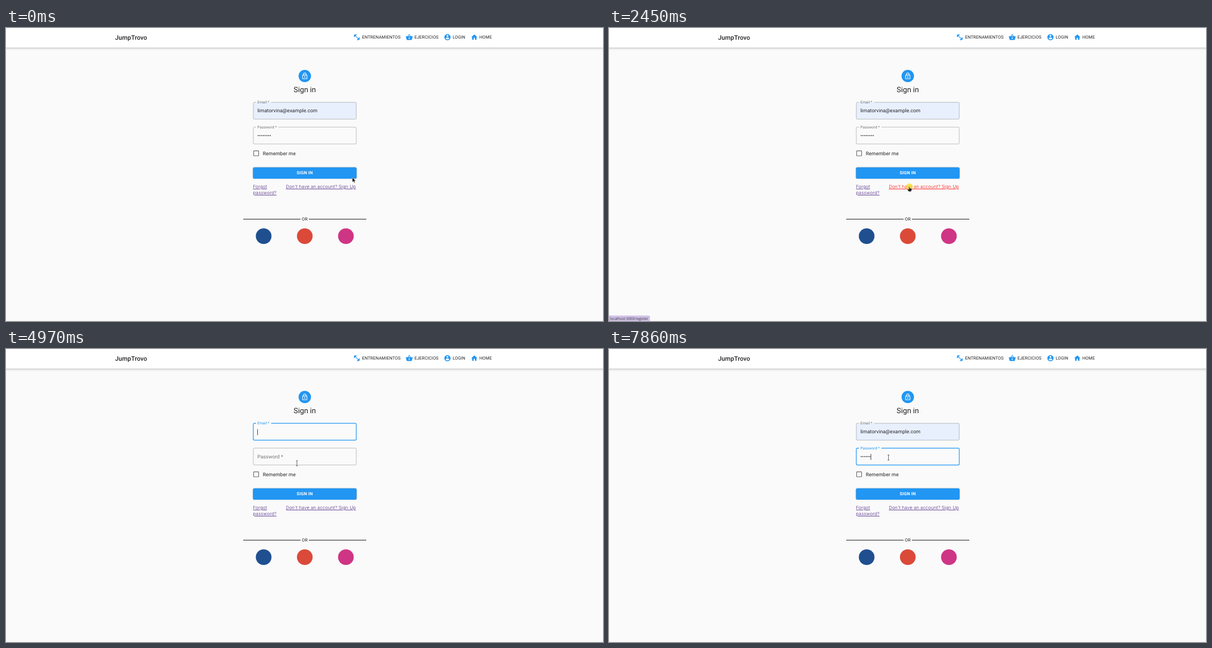
An HTML page that plays this animation: 1067 px wide and 525 px high, repeating every 7.99 s.

```html
<!DOCTYPE html>
<html lang="es">
<head>
<meta charset="utf-8">
<title>Sign in</title>
<style>
  html, body { margin: 0; width: 100%; height: 100%; overflow: hidden; background: #fafafa; }
  svg { display: block; }
  text { font: 8.89px Roboto, sans-serif; letter-spacing: .00938em; fill: #212121; text-rendering: geometricPrecision; white-space: pre; }
  .small { font-size: 7.78px; letter-spacing: .0107em; }
  .brand { font-size: 11.11px; font-weight: 500; }
  .title { font-size: 13.34px; letter-spacing: 0; text-anchor: middle; }
  .mid { text-anchor: middle; }
  .cta { font-size: 7.78px; font-weight: 700; letter-spacing: .0286em; text-anchor: middle; fill: #fff; }
  .link { font: 8.1px Inter, sans-serif; font-weight: 350; letter-spacing: .15px; fill: #4c2383; text-decoration: underline .6px; text-underline-offset: 1.2px; }
  .link.hot { fill: #f00; }
  .menu text { font: 6.75px "Open Sans", sans-serif; letter-spacing: 0; fill: #f1f1f1; }
  .menu .bold { font-weight: 600; }
  .menu rect { fill: #28292c; filter: drop-shadow(0 1px 1px #0005); }
  .menu path { stroke: #3e3f43; stroke-width: .7; }
  .bar { filter: drop-shadow(0 .9px .6px #0007) drop-shadow(0 1px 2px #0004); }
  .button { fill: #2196f3; filter: drop-shadow(0 .9px .5px #0006) drop-shadow(0 .5px 1px #0003); }
  #status text { font: 6.4px "Open Sans", sans-serif; letter-spacing: 0; fill: #33303a; }
</style>
</head>
<body>
<svg id="stage" width="1067" height="525" viewBox="0 0 1067 525"></svg>
<script>
const LOOP = 7990;
const MAIL = 'limatorvina@example.com', MAIL2 = 'torvinalima57@example.com';
const OPEN_REGISTER = 2580, OPEN_LOGIN = 4640, FILL = 5700, FOCUS_PASS = 6180;
const KEYS = [6910, 6980, 7180, 7450, 7660, 7860];
const CLICKS = [2380, 3250, 4520, 5180, 5640, 6180];
const stage = document.getElementById('stage');
const $ = id => document.getElementById(id);

const text = (x, y, s, cls = '', id = '') => `<text x="${x}" y="${y}" class="${cls}" id="${id}">${s}</text>`;
const icon = (x, y, d, fill = '#2196f3') =>
  `<path transform="translate(${x - 6.67} ${y - 6.67}) scale(.5557)" d="${d}" fill="${fill}" fill-rule="evenodd"/>`;

const icons = {
  weights: 'M20.57 14.86L22 13.43 20.57 12 17 15.57 8.43 7 12 3.43 10.57 2 9.14 3.43 7.71 2 5.57 4.14 4.14 2.71 2.71 4.14l1.43 1.43L2 7.71l1.43 1.43L2 10.57 3.43 12 7 8.43 15.57 17 12 20.57 13.43 22l1.43-1.43L16.29 22l2.14-2.14 1.43 1.43 1.43-1.43-1.43-1.43L22 16.29z',
  basket: 'M17.2 9l-4.4-6.6q-.8-.8-1.6 0L6.8 9H2q-1.2.2-1 1.3l2.6 9.2Q4 21 5.5 21h13q1.5 0 1.9-1.5l2.6-9.2Q23.2 9.2 22 9zM9 9l3-4.4L15 9zm3 8a2 2 0 1 1 .01 0z',
  person: 'M12 2a10 10 0 1 0 .01 0zm0 3a3 3 0 1 1-.01 0zm0 14.2a7.2 7.2 0 0 1-6-3.2c0-2 4-3.1 6-3.1s6 1.1 6 3.1a7.2 7.2 0 0 1-6 3.2z',
  home: 'M10 20v-6h4v6h5v-8h3L12 3 2 12h3v8z',
  lock: 'M12 17a2 2 0 1 0-.01 0zM18 8h-1V6A5 5 0 0 0 7 6v2H6a2 2 0 0 0-2 2v10a2 2 0 0 0 2 2h12a2 2 0 0 0 2-2V10a2 2 0 0 0-2-2zM8.9 6a3.1 3.1 0 0 1 6.2 0v2H8.9zM18 20H6V10h12z'
};
const nav = [
  [627, 636.4, 'ENTRENAMIENTOS', 'weights'], [720.7, 730, 'EJERCICIOS', 'basket'],
  [789, 798.3, 'LOGIN', 'person'], [837, 846, 'HOME', 'home']
];

const field = (id, y) => `<g id="${id}" data-y="${y}">
  <rect x="442" y="${y + .4}" width="184" height="30.2" rx="2" fill="#e8f0fe"/>
  <path fill="none"/>
  <text class="label"></text>
  <text class="value" x="449.3" y="${y + 18.6}"></text>
  <line y1="${y + 10.8}" y2="${y + 21.6}" stroke="#111" stroke-width=".8"/></g>`;

const menu = (id, bottom, rows) => `<g id="${id}" class="menu">
  <rect x="441.5" y="164.5" width="185" height="${bottom - 164.5}" rx="2"/>
  <path d="M441.5 ${bottom - 22}h185"/>${rows}${text(448, bottom - 8.3, 'Gestionar...')}</g>`;

const account = (mail, i) =>
  text(448, 178 + i * 36, mail, 'bold') + text(448, 189 + i * 36, '••••••••');

stage.innerHTML = `
  <rect class="bar" x="-10" y="-10" width="1087" height="45" fill="#fff"/>
  ${text(195, 20.7, 'JumpTrovo', 'brand')}
  ${nav.map(([ix, x, s, k]) => icon(ix, 16.5, icons[k]) + text(x, 19.1, s, 'small')).join('')}
  <circle id="avatar" cx="534" cy="86" r="11.1"/>
  ${icon(534, 86, icons.lock, '#fff')}
  ${text(534, 115, '', 'title', 'title')}
  ${field('email', 132.7)}
  ${field('second', 177.2)}
  <g id="login">
    <rect x="442.6" y="220.1" width="8.9" height="8.9" rx=".6" fill="none" stroke="#6a666a" stroke-width="1.1"/>
    ${text(459, 227.6, 'Remember me')}
    ${text(441.5, 287, 'Forgot', 'link')}${text(441.5, 298.1, 'password?', 'link')}
    ${text(500.2, 287, "Don't have an account? Sign Up", 'link', 'signUp')}
  </g>
  <g id="register">
    ${field('third', 221.7)}
    ${text(441.5, 308.2, 'Have account? Login!', 'link', 'haveOne')}
  </g>
  <g id="submit">
    <rect class="button" x="441.5" y="249.8" width="185" height="20.2" rx="2.2"/>
    ${text(534, 262.1, '', 'cta', 'cta')}
  </g>
  <g id="social">
    <path d="M424 342.5H526.5M541.3 342.5H644" stroke="#1c1c1c"/>
    ${text(534, 345.3, 'OR', 'small mid')}
    <circle cx="460.5" cy="373" r="14" fill="#1f4f8f"/>
    <circle cx="534" cy="373" r="14" fill="#db4a39"/>
    <circle cx="607.5" cy="373" r="14" fill="#cf3585"/>
  </g>
  ${menu('mailMenu', 216, text(448, 181.6, MAIL2, 'bold'))}
  ${menu('accountMenu', 296, [MAIL, MAIL2, 'limatorvina57@example.com'].map(account).join(''))}
  <g id="status"><rect y="515.3" height="12" x="-3" rx="2" fill="#d0c0e6"/>${text(2, 523, '')}</g>
  <circle id="click" r="6" fill="#f4df2f" opacity=".8"/>
  <g id="pointer">
    <path id="arrow" d="M0 0V8.3L2 6.5 3.3 9.3 4.8 8.6 3.5 5.9H6.2Z" fill="#111" stroke="#fff" stroke-width=".5"/>
    <path id="beam" d="M-1.7-4.6H1.7M0-4.6V4.6M-1.7 4.6H1.7" fill="none" stroke="#444" stroke-width=".8"/>
    <path id="hand" d="M-1.2-3V1.2L-3.2.3-3.8 1.4-1.5 5H3L4.2 1.5V-.2L.4-1.1V-3Q-.4-4-1.2-3Z" fill="#222" stroke="#fff" stroke-width=".4"/>
  </g>`;

// time, x, y, shape shown from here on
const path = [
  [0, 619, 268, 'arrow'], [70, 619, 268, 'arrow'], [350, 588, 212, 'arrow'], [430, 572, 192, 'beam'],
  [820, 490, 151, 'beam'], [1100, 476, 155, 'beam'], [1350, 500, 190, 'beam'], [1500, 520, 225, 'arrow'],
  [1640, 528, 266, 'hand'], [1850, 534, 283, 'hand'], [2300, 537, 288, 'hand'], [2640, 537, 288, 'arrow'],
  [2950, 540, 165, 'beam'], [3200, 530, 150, 'beam'], [3330, 532, 152, 'arrow'], [3870, 698, 239, 'arrow'],
  [4080, 660, 262, 'arrow'], [4320, 505, 304, 'hand'], [4520, 488, 305, 'hand'], [4660, 488, 305, 'arrow'],
  [4860, 512, 225, 'beam'], [4970, 520, 205, 'beam'], [5170, 506, 150, 'beam'], [5230, 505, 152, 'arrow'],
  [5370, 500, 180, 'arrow'], [FILL, 500, 180, 'beam'], [5930, 500, 180, 'beam'], [6150, 499.5, 194.5, 'beam'],
  [LOOP, 499.5, 194.5, 'beam']
];

function pointerAt(t) {
  const i = path.findIndex(p => p[0] > t) - 1;
  const [t0, x0, y0, shape] = path[i], [t1, x1, y1] = path[i + 1];
  const k = (t - t0) / (t1 - t0);
  return { x: x0 + (x1 - x0) * k, y: y0 + (y1 - y0) * k, shape };
}

const show = (id, on) => $(id).style.display = on ? '' : 'none';

// lift: 0 rests the label inside the box, 1 sets it on the border
function setField(id, name, gap, { value = '', focus = false, hover = false, filled = false, lift = 0, caret = false }) {
  const g = $(id), y = +g.dataset.y;
  const [fill, border, label, val, bar] = g.children;
  fill.style.display = filled ? '' : 'none';
  const notch = 447 + gap * lift;
  border.setAttribute('d', `M${notch} ${y + .4}H624a2 2 0 0 1 2 2v26.2a2 2 0 0 1-2 2H444a2 2 0 0 1-2-2v-26.2a2 2 0 0 1 2-2H447`);
  border.setAttribute('stroke', focus ? '#2196f3' : hover ? '#212121' : 'rgba(0,0,0,.31)');
  border.setAttribute('stroke-width', focus ? 1.2 : .8);
  label.textContent = name + ' *';
  label.style.fill = focus ? '#2196f3' : 'rgba(0,0,0,.54)';
  label.setAttribute('transform', `translate(449.3 ${y + 18.6 - 16.3 * lift}) scale(${1 - .25 * lift})`);
  val.textContent = value;
  bar.style.display = caret ? '' : 'none';
  if (caret) {
    const x = 449.6 + (value ? val.getComputedTextLength() : 0);
    bar.setAttribute('x1', x);
    bar.setAttribute('x2', x);
  }
}

function draw(t) {
  const registering = t >= OPEN_REGISTER && t < OPEN_LOGIN;
  const first = t < OPEN_REGISTER;
  const p = pointerAt(t);
  const over = y => first && p.shape === 'beam' && p.x < 627 && p.y > y && p.y < y + 31;
  const blink = from => (t - from) % 1060 < 530;

  show('login', !registering);
  show('register', registering);
  $('avatar').setAttribute('fill', registering ? '#f50057' : '#2196f3');
  $('title').textContent = registering ? 'Register' : 'Sign in';
  $('cta').textContent = registering ? 'REGISTER' : 'SIGN IN';
  $('submit').setAttribute('transform', `translate(0 ${registering ? 21.1 : 0})`);
  $('social').setAttribute('transform', `translate(0 ${registering ? 10 : 0})`);

  const typing = t >= FOCUS_PASS;
  const mailFocus = !first && !typing;
  const hasMail = first || t >= FILL;
  const mailStart = [FILL, OPEN_LOGIN, 3300, OPEN_REGISTER].find(s => s <= t);
  setField('email', 'Email', 27, {
    value: hasMail ? MAIL : '', filled: hasMail, lift: 1, focus: mailFocus,
    hover: over(132.7), caret: mailFocus && blink(mailStart)
  });

  if (registering) {
    setField('second', 'Name', 28, {});
    setField('third', 'Password', 40, {});
  } else {
    const typed = KEYS.filter(k => k <= t);
    const k = Math.min(1, Math.max(0, (t - FOCUS_PASS) / 200));
    setField('second', 'Password', 40, {
      value: '•'.repeat(first ? 8 : typed.length), lift: first ? 1 : 1 - (1 - k) ** 3,
      focus: typing, hover: over(177.2), caret: typing && blink(typed.at(-1) ?? FOCUS_PASS)
    });
  }

  show('mailMenu', t >= 3300 && t < 4140);
  show('accountMenu', t >= 5240 && t < FILL);

  const upHot = t >= 1850 && first, inHot = t >= 4320 && registering;
  $('signUp').classList.toggle('hot', upHot);
  $('haveOne').classList.toggle('hot', inHot);
  show('status', upHot || inHot);
  if (upHot || inHot) {
    const [box, label] = $('status').children;
    label.textContent = 'localhost:3000/' + (upHot ? 'register' : 'login');
    box.setAttribute('width', label.getComputedTextLength() + 8);
  }

  show('click', CLICKS.some(c => t >= c && t < c + 200));
  $('click').setAttribute('cx', p.x);
  $('click').setAttribute('cy', p.y - (p.shape === 'hand' ? 3.5 : 0));
  $('pointer').setAttribute('transform', `translate(${p.x} ${p.y})`);
  for (const s of ['arrow', 'beam', 'hand']) show(s, s === p.shape);
}

const start = performance.now();
function tick() {
  draw((performance.now() - start) % LOOP);
  requestAnimationFrame(tick);
}
tick();
</script>
</body>
</html>
```
